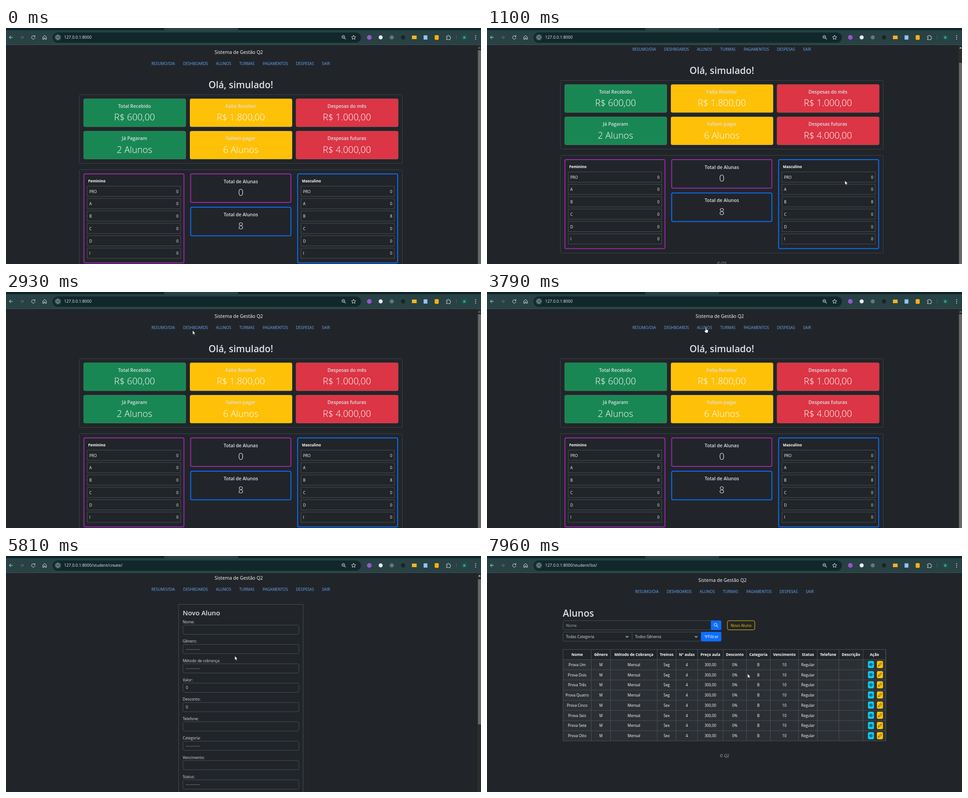
Write an HTML page that moves like this. It is 1059 by 529 pixels and loops after 8000 ms.

```html
<!DOCTYPE html>
<html lang="pt">
<head>
<meta charset="utf-8">
<title>Sistema de Gestão Q2</title>
<style>
  html, body { margin: 0; width: 100%; height: 100%; overflow: hidden; background: #212529; }
  svg { display: block; width: 1059px; height: 529px; font-family: 'Open Sans', 'Noto Sans', sans-serif; }
  text { white-space: pre; }
</style>
</head>
<body>
<svg id="stage" viewBox="0 0 1059 529"></svg>
<script>
const LOOP = 8000;
const BG = '#212529', BORDER = '#495057', SOFT = '#dee2e6', BLUE = '#0d6efd',
      YELLOW = '#ffc107', GREEN = '#198754', RED = '#dc3545', PURPLE = '#9c27b0';

// y is the vertical middle of the capitals
function text(x, y, str, { size = 8.45, anchor = 'start', weight = 400, fill = '#fff', spacing = 0 } = {}) {
  return `<text x="${x}" y="${(y + size * .357).toFixed(2)}" font-size="${size}" font-weight="${weight}"
    text-anchor="${anchor}" fill="${fill}" letter-spacing="${spacing}">${str}</text>`;
}
const middle = (x, y, str, options) => text(x, y, str, { anchor: 'middle', ...options });
const rect = (x, y, w, h, fill, stroke = 'none', r = 0, sw = 1) =>
  `<rect x="${x}" y="${y}" width="${w}" height="${h}" rx="${r}" fill="${fill}" stroke="${stroke}" stroke-width="${sw}"/>`;
const line = (d, stroke = '#dfe7e7', sw = 1) =>
  `<path d="${d}" fill="none" stroke="${stroke}" stroke-width="${sw}"/>`;
const circle = (x, y, r, fill, stroke = 'none') =>
  `<circle cx="${x}" cy="${y}" r="${r}" fill="${fill}" stroke="${stroke}"/>`;
const magnifier = (x, y, color) =>
  circle(x - 1, y - 1, 3.2, 'none', color) + line(`M${x + 1.4} ${y + 1.4}l3 3`, color, 1.2);

const NAV = [[350.5, 'RESUMO/DIA'], [422.5, 'DESHBOARDS'], [485, 'ALUNOS'], [537, 'TURMAS'],
             [600.5, 'PAGAMENTOS'], [666.5, 'DESPESAS'], [713.5, 'SAIR']];
const header = dx => middle(519 + dx, 54, 'Sistema de Gestão Q2', { size: 10.5 }) +
  NAV.map(([x, label]) => middle(x + dx, 80, label, { size: 8.55, fill: '#6ea8fe' })).join('');
const footer = (x, y) => middle(x, y, '© Q2', { size: 8.6, fill: '#adb5bd' });

// Home
function card(x, y, color, title, value) {
  return rect(x, y, 228, 63, color, 'rgba(255,255,255,.12)', 3.5) +
    middle(x + 113.5, y + 16.5, title, { size: 10.4, weight: 600, fill: SOFT }) +
    middle(x + 113.5, y + 41.5, value, { size: 20.3, weight: 300 });
}
function levels(x, color, title, counts) {
  const rows = ['PRO', 'A', 'B', 'C', 'D', 'I'].map((level, i) => {
    const y = 354.5 + i * 27.75;
    return rect(x + 7.5, y, 208, 23, 'none', BORDER) + text(x + 12, y + 12, level) +
      text(x + 211, y + 12, counts[i], { anchor: 'end' });
  });
  return rect(x, 327, 223, 199.5, 'none', color, 3, 2) +
    text(x + 9.5, 343.5, title, { size: 8.3, weight: 700 }) + rows.join('');
}
function total(y, color, title, value) {
  return rect(411.7, y, 223.5, 64, 'none', color, 3, 2) +
    middle(523.5, y + 17, title, { size: 10.4, weight: 600, fill: SOFT }) +
    middle(523.5, y + 42, value, { size: 20.3, weight: 300 });
}
const homePage = header(0) +
  middle(523.5, 128, 'Olá, simulado!', { size: 20.9, weight: 600, fill: SOFT }) +
  rect(163.5, 149.5, 720, 154, 'none', '#3d4348', 3) +
  card(173, 158.5, GREEN, 'Total Recebido', 'R$ 600,00') +
  card(410, 158.5, YELLOW, 'Falta Receber', 'R$ 1.800,00') +
  card(646.5, 158.5, RED, 'Despesas do mês', 'R$ 1.000,00') +
  card(173, 231, GREEN, 'Já Pagaram', '2 Alunos') +
  card(410, 231, YELLOW, 'Faltam pagar', '6 Alunos') +
  card(646.5, 231, RED, 'Despesas futuras', 'R$ 4.000,00') +
  rect(163.5, 317.5, 720, 219, 'none', '#3d4348', 3) +
  levels(173.7, PURPLE, 'Feminino', [0, 0, 0, 0, 0, 0]) +
  levels(650.2, BLUE, 'Masculino', [0, 0, 8, 0, 0, 0]) +
  total(327, PURPLE, 'Total de Alunas', 0) + total(401.7, BLUE, 'Total de Alunos', 8) +
  footer(523.5, 560);

// Student list
const EDGES = [169.5, 232.5, 275.5, 379.5, 421.5, 469.5, 526.5, 578.5, 631.5, 694.5, 736.5, 784.5, 838.5, 889];
const HEADS = ['Nome', 'Gênero', 'Método de Cobrança', 'Treinos', 'Nº aulas', 'Preço aula', 'Desconto',
               'Categoria', 'Vencimento', 'Status', 'Telefone', 'Descrição', 'Ação'];
const STUDENTS = ['Um', 'Dois', 'Três', 'Quatro', 'Cinco', 'Seis', 'Sete', 'Oito'];
const cells = (values, y, weight) =>
  values.map((v, i) => middle((EDGES[i] + EDGES[i + 1]) / 2, y, v, { weight })).join('');
const actions = y =>
  rect(849.3, y - 8, 13.5, 16, '#0dcaf0', 'none', 3) + rect(869.3, y - 8, 13.5, 16, YELLOW, 'none', 3) +
  line(`M851.8 ${y}q4.2-6 8.4 0q-4.2 6-8.4 0Z`, '#111', .8) + circle(856, y, 1.4, 'none', '#111') +
  line(`M872.3 ${y + 3.8}l.8-2.7 5-5 1.9 1.9-5 5Z`, '#111', .8);
function select(x, label) {
  return rect(x, 170.5, 154, 20.5, BG, BORDER, 2) + text(x + 6.5, 181, label, { fill: SOFT }) +
    line(`M${x + 140} 179.5l2.8 2.8 2.8-2.8`, SOFT, 1.2);
}
function studentTable() {
  const rows = STUDENTS.map((name, i) => {
    const y = 243.7 + i * 22.78;
    return cells(['Prova ' + name, 'M', 'Mensal', i < 4 ? 'Seg' : 'Sex', 4, '300,00', '0%', 'B', 10, 'Regular'], y, 400) +
      actions(y - .5);
  });
  const rules = STUDENTS.map((_, i) => `M169 ${232.3 + i * 22.78}H889`).join('');
  return rect(169.5, 232, 719.5, 182.5, '#2c3034') + rect(169.5, 209.5, 719.5, 205, 'none', BORDER) +
    line(rules + EDGES.map(x => `M${x} 209V414.5`).join(''), BORDER) + cells(HEADS, 221, 700) + rows.join('');
}
const listPage = header(6) +
  text(169, 128, 'Alunos', { size: 21, weight: 600, fill: SOFT }) +
  rect(169.5, 145, 340, 20.5, BG, BORDER, 3.5) + text(176, 155.5, 'Nome', { fill: '#a7acb1' }) +
  rect(499, 144.5, 23.5, 21.5, BLUE, 'none', 3) + magnifier(510.5, 155, '#fff') +
  rect(536, 145, 61, 20.5, 'none', YELLOW, 3.5) + middle(566.5, 155.5, 'Novo Aluno', { size: 8.6, fill: YELLOW }) +
  select(169.5, 'Todas Categoria') + select(323.5, 'Todos Gêneros') +
  rect(477, 170, 45.5, 21.5, BLUE, 'none', 3) + line('M485 178.7h7.4M486.4 181h4.6M487.6 183.2h2.2', '#fff', .9) +
  text(492.3, 181, 'Filtrar', { size: 8.6 }) +
  studentTable() + footer(529.5, 448);

// New student form
const DASHES = '---------';
const FIELDS = [['Nome'], ['Gênero', DASHES], ['Método de cobrança', DASHES], ['Valor', 0], ['Desconto', 0],
                ['Telefone'], ['Categoria', DASHES], ['Vencimento'], ['Status', DASHES], ['Treinos'], ['Descrição']];
const field = ([label, value = ''], i) => {
  const y = 153 + i * 43.37;
  return text(394, y, label + ':', { fill: SOFT }) + rect(394.5, y + 6.8, 258.5, 20.7, 'none', BORDER, 3.5) +
    text(401, y + 17.3, value, { fill: SOFT, spacing: value === DASHES ? .85 : 0 });
};
const formPage = header(0) + rect(384.9, 113.5, 277.5, 555, 'none', BORDER) +
  text(394, 133, 'Novo Aluno', { size: 14.9, weight: 600, fill: SOFT }) +
  FIELDS.map(field).join('') +
  rect(394, 638, 48, 21, GREEN, 'none', 3.5) + middle(418, 648.5, 'Salvar') +
  rect(594, 638, 59, 21, RED, 'none', 3.5) + middle(623.5, 648.5, 'Cancelar') +
  footer(523.5, 695);

// Browser frame
const toolbar =
  rect(0, 0, 1059, 38, '#284145') + rect(0, 0, 353, 5, '#0d2527', 'none', 2) + rect(517, 0, 542, 5, '#0d2527', 'none', 2) +
  rect(0, 37, 1059, 1, '#3d5357') + rect(104, 10, 687.5, 23, '#10282c', 'none', 11.5) +
  line('M15 21H7.5M11 17.3L7.3 21l3.7 3.7') + line('M31.5 21H39M35.5 17.3l3.7 3.7-3.7 3.7', '#6d7f82') +
  line('M63.7 18.6a3.8 3.8 0 1 0 .9 3M64.6 16.5v2.8h-2.8') +
  line('M82 20.2l4-3.4 4 3.4V25.3h-2.6v-3h-2.8v3H82Z') +
  circle(115.7, 21, 7.8, '#2a4347') + circle(115.7, 21, 4.2, 'none', '#dfe7e7') + line('M115.7 20.4v3M115.7 18.4v1') +
  magnifier(753, 21, '#dfe7e7') + line('M750.2 20h3.6') +
  line('M775 16.2l1.4 3.1 3.4.4-2.5 2.3.7 3.4-3-1.7-3 1.7.7-3.4-2.5-2.3 3.4-.4Z') +
  circle(810, 21, 5.2, '#9457cf') + circle(835.3, 21, 4.5, '#e8eeee') + circle(860, 21, 4.5, '#64777a') +
  circle(885.3, 21, 4.8, '#1c2425') + rect(905, 17, 10.5, 8, '#f2b51d') + rect(931, 16.5, 8.5, 9.5, '#8fc3f5') +
  rect(955.7, 16, 9, 10.5, '#fbb20f', 'none', 2) +
  line('M982 18.2h2.4a1.6 1.6 0 0 1 3.2 0H990v2.4a1.6 1.6 0 0 1 0 3.2V26H982v-2.2a1.6 1.6 0 0 0 0-3.2Z') +
  rect(1003.5, 16, 1, 10, '#4d6366') + circle(1022, 21, 6.5, '#0c5a50') + middle(1022, 21, 'R', { size: 7 }) +
  [17, 21, 25].map(y => circle(1047, y, 1, '#dfe7e7')).join('');

const CURSORS = {
  arrow: '<path d="M0 0V9.3L2.1 7.4 3.6 10.5 5 9.9 3.6 6.8H6.4Z" fill="#fff" stroke="#111" stroke-width=".6"/>',
  hand: `<path d="M-1 0Q0-1.4 1 0V4.2L4 4.8Q5.4 5.2 5.2 6.8L4.4 11.5H-.6L-3.4 7.4Q-3.4 6-2 6.3L-1 7.2Z"
    fill="#fff" stroke="#111" stroke-width=".6"/>`,
  beam: line('M-1.5-4.5H1.5M0-4.5V4.5M-1.5 4.5H1.5', '#e8e8e8', .9),
};

// [time, x, y, shape until the next key]
const POINTER = [
  [0, 830, 545, 'arrow'], [520, 830, 545, 'arrow'], [900, 798, 342, 'arrow'], [1750, 798, 342, 'arrow'],
  [2330, 419, 90, 'arrow'], [2460, 416, 86, 'arrow'], [2930, 416, 86, 'arrow'], [3350, 452, 92, 'arrow'],
  [3720, 488, 80, 'hand'], [4260, 488, 80, 'arrow'], [4540, 655, 262, 'arrow'], [4700, 515, 230, 'beam'],
  [4770, 508, 225, 'beam'], [4840, 515, 205, 'arrow'], [5030, 545, 155, 'hand'], [5200, 545, 155, 'arrow'],
  [5620, 545, 155, 'arrow'], [5790, 510, 224, 'arrow'], [6060, 510, 224, 'arrow'], [6390, 612, 429, 'hand'],
  [6800, 612, 429, 'arrow'], [7200, 625, 478, 'arrow'], [7320, 625, 478, 'arrow'], [7570, 574, 418, 'arrow'],
  [7770, 574, 418, 'arrow'], [7960, 581, 264, 'arrow'], [8000, 581, 264, 'arrow'],
];
const SCROLL = [
  [0, 0], [900, 0], [1100, 32], [1560, 32], [1690, 0], [5740, 0], [5810, 5], [6200, 220], [8000, 220],
];
const PAGES = [
  [0, 'home', '127.0.0.1:8000'], [3850, 'list', '127.0.0.1:8000/student/list/'],
  [5220, 'form', '127.0.0.1:8000/student/create/'], [6800, 'list', '127.0.0.1:8000/student/list/'],
];
const THUMBS = { home: { height: 490, ratio: .875 }, form: { height: 325, ratio: .5 } };

const lastKey = (keys, t) => keys.findLastIndex(key => key[0] <= t);
function ease(keys, t, column) {
  const i = lastKey(keys, t), a = keys[i], b = keys[i + 1] || a;
  const u = b === a ? 0 : (t - a[0]) / (b[0] - a[0]);
  return a[column] + (b[column] - a[column]) * u * u * (3 - 2 * u);
}

const stage = document.getElementById('stage');
stage.innerHTML = rect(0, 0, 1059, 529, BG) +
  `<g id="home">${homePage}</g><g id="list">${listPage}</g><g id="form">${formPage}</g>
  <g id="bar">${rect(1051, 38, 8, 491, '#2c2c2c')}
    <path id="up" d="M1053 46l2.8-3.6 2.8 3.6Z"/><rect id="thumb" x="1052.3" width="6.7" fill="#686868"/></g>
  ${toolbar}${text(129.5, 21, '', { size: 9.05, fill: '#e6eded' }).replace('<text', '<text id="url"')}
  <g id="pointer"></g>`;
const el = Object.fromEntries([...stage.querySelectorAll('[id]')].map(node => [node.id, node]));

function draw(t) {
  const [, page, address] = PAGES[lastKey(PAGES, t)];
  const scroll = page === 'list' ? 0 : ease(SCROLL, t, 1);
  for (const name of ['home', 'list', 'form']) el[name].style.display = name === page ? '' : 'none';
  el[page].setAttribute('transform', `translate(0 ${-scroll})`);
  el.url.textContent = address;

  const thumb = THUMBS[page];
  el.bar.style.display = thumb ? '' : 'none';
  if (thumb) {
    el.thumb.setAttribute('y', 50 + scroll * thumb.ratio);
    el.thumb.setAttribute('height', thumb.height);
    el.up.setAttribute('fill', scroll > 0 ? '#d0d0d0' : '#777');
  }

  const shape = POINTER[lastKey(POINTER, t)][3];
  if (el.pointer.dataset.shape !== shape) {
    el.pointer.dataset.shape = shape;
    el.pointer.innerHTML = CURSORS[shape];
  }
  el.pointer.setAttribute('transform', `translate(${ease(POINTER, t, 1)} ${ease(POINTER, t, 2)})`);
}

function frame() {
  draw(performance.now() % LOOP);
  requestAnimationFrame(frame);
}
frame();
</script>
</body>
</html>
```
